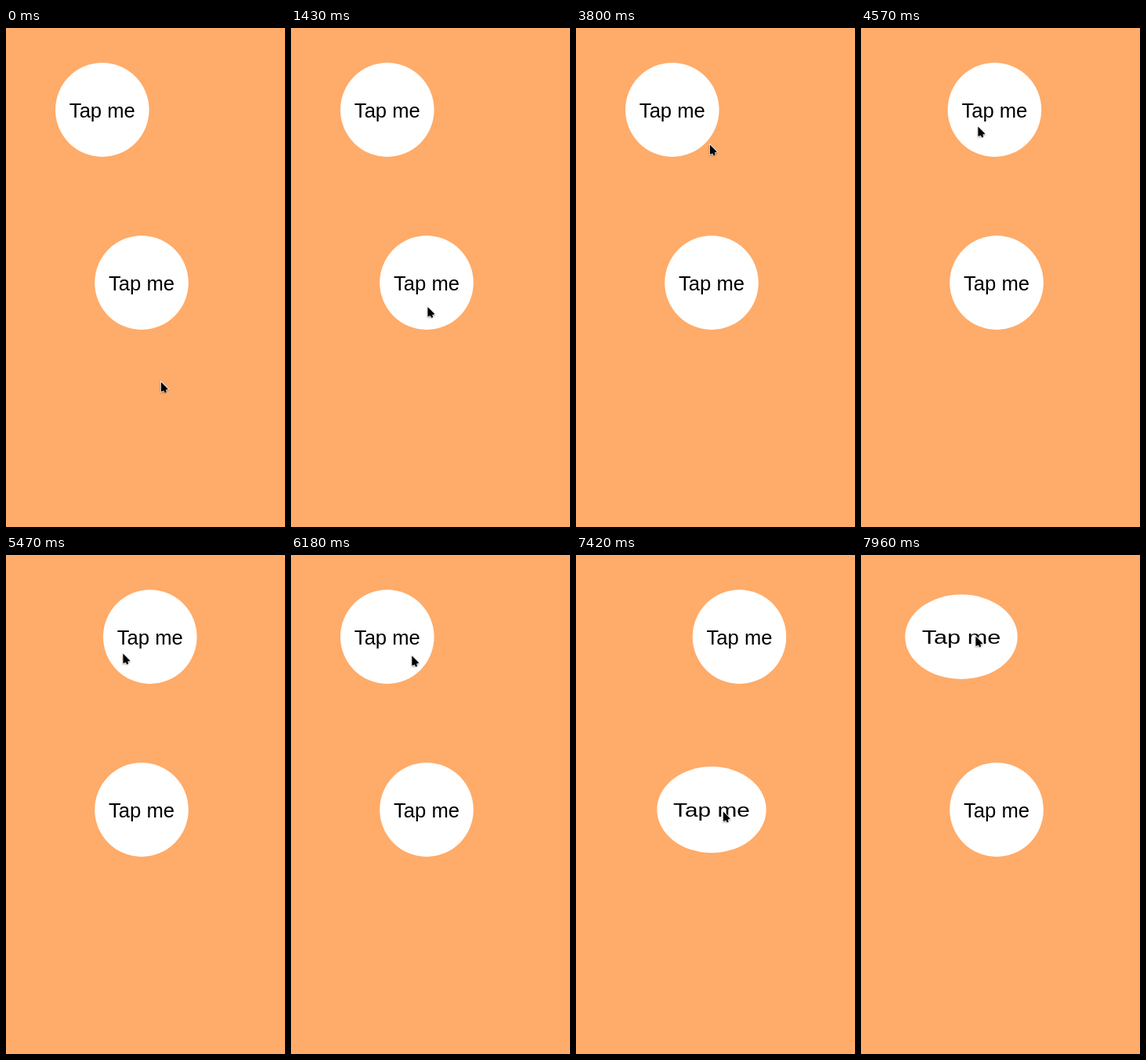
An HTML page with a canvas that plays this animation: 356x635 px, repeating every 8000 ms.

```html
<!DOCTYPE html>
<html lang="en">
<head>
<meta charset="utf-8">
<title>Tap me</title>
<style>
  html, body { margin: 0; width: 100%; height: 100%; overflow: hidden; background: #ffab69; }
  canvas { display: block; width: 356px; height: 635px; }
</style>
</head>
<body>
<canvas id="stage"></canvas>
<script>
const W = 356, H = 635, LOOP = 8000;
const RADIUS = 59.8, SQUASH = 300, SLIDE = 2000, REACH = 94;
const canvas = document.getElementById('stage');
const ctx = canvas.getContext('2d');
const dpr = window.devicePixelRatio || 1;
canvas.width = W * dpr;
canvas.height = H * dpr;

const buttons = [
  { x: 122.8, y: 104.1, reach: REACH, taps: [4067, 6229, 7810] },
  { x: 173, y: 324.1, reach: 0, taps: [1590, 2306, 2900, 7230] }
];

// Each move bows sideways by a share of its length
const home = { x: 197, y: 449 };
const moves = [
  { start: 850, end: 1440, x: 173.5, y: 353.5, bow: 0.1 },
  { start: 3200, end: 3770, x: 170, y: 147, bow: 0.53 },
  { start: 3800, end: 4050, x: 148.5, y: 124, bow: 0 },
  { start: 6080, end: 6190, x: 153.5, y: 127, bow: 0 },
  { start: 6830, end: 7200, x: 174, y: 345, bow: -0.5 },
  { start: 7340, end: 7800, x: 145.5, y: 102, bow: 0.45 }
];

const ease = u => (1 - Math.cos(Math.PI * u)) / 2;
// Rises from 0 to 1 and returns within the given duration
const pulse = (age, length) => age < length ? ease(2 * age / length) : 0;

function pointerAt(t) {
  let from = home;
  for (const m of moves) {
    if (t < m.start) break;
    if (t >= m.end) { from = m; continue; }
    const u = ease((t - m.start) / (m.end - m.start));
    const dx = m.x - from.x, dy = m.y - from.y;
    const side = 2 * u * (1 - u) * m.bow;
    return { x: from.x + dx * u - dy * side, y: from.y + dy * u + dx * side };
  }
  return from;
}

function drawButton({ x, y, reach, taps }, t) {
  const age = t - Math.max(-Infinity, ...taps.filter(tap => tap <= t));
  const squash = pulse(age, SQUASH);
  ctx.save();
  ctx.translate(x + reach * pulse(age, SLIDE), y);
  ctx.scale(1 + 0.2 * squash, 1 - 0.1 * squash);
  ctx.fillStyle = '#fff';
  ctx.beginPath();
  ctx.arc(0, 0, RADIUS, 0, 2 * Math.PI);
  ctx.fill();
  ctx.fillStyle = '#000';
  ctx.fillText('Tap me', 0, 9.5);
  ctx.restore();
}

function drawPointer({ x, y }) {
  const head = new Path2D('M0 0V12.4L9 9Z');
  const tail = new Path2D('M3.5 8L5.8 13.4');
  const paint = (color, edge) => {
    ctx.strokeStyle = ctx.fillStyle = color;
    ctx.lineWidth = 2.2 + edge;
    ctx.stroke(tail);
    ctx.lineWidth = edge;
    if (edge) ctx.stroke(head);
    ctx.fill(head);
  };
  ctx.save();
  ctx.translate(x + 0.9, y + 1.4);
  ctx.save();
  ctx.shadowColor = 'rgba(0,0,0,0.25)';
  ctx.shadowBlur = 2 * dpr;
  ctx.shadowOffsetY = dpr;
  paint('#fff', 1.6);
  ctx.restore();
  paint('#000', 0);
  ctx.restore();
}

function draw(t) {
  ctx.setTransform(dpr, 0, 0, dpr, 0, 0);
  ctx.fillStyle = '#ffab69';
  ctx.fillRect(0, 0, W, H);
  ctx.font = '25.6px "Liberation Sans", Arial, sans-serif';
  ctx.textAlign = 'center';
  buttons.forEach(b => drawButton(b, t));
  drawPointer(pointerAt(t));
}

const begin = performance.now();
function tick() {
  draw((performance.now() - begin) % LOOP);
  requestAnimationFrame(tick);
}
tick();
</script>
</body>
</html>
```
